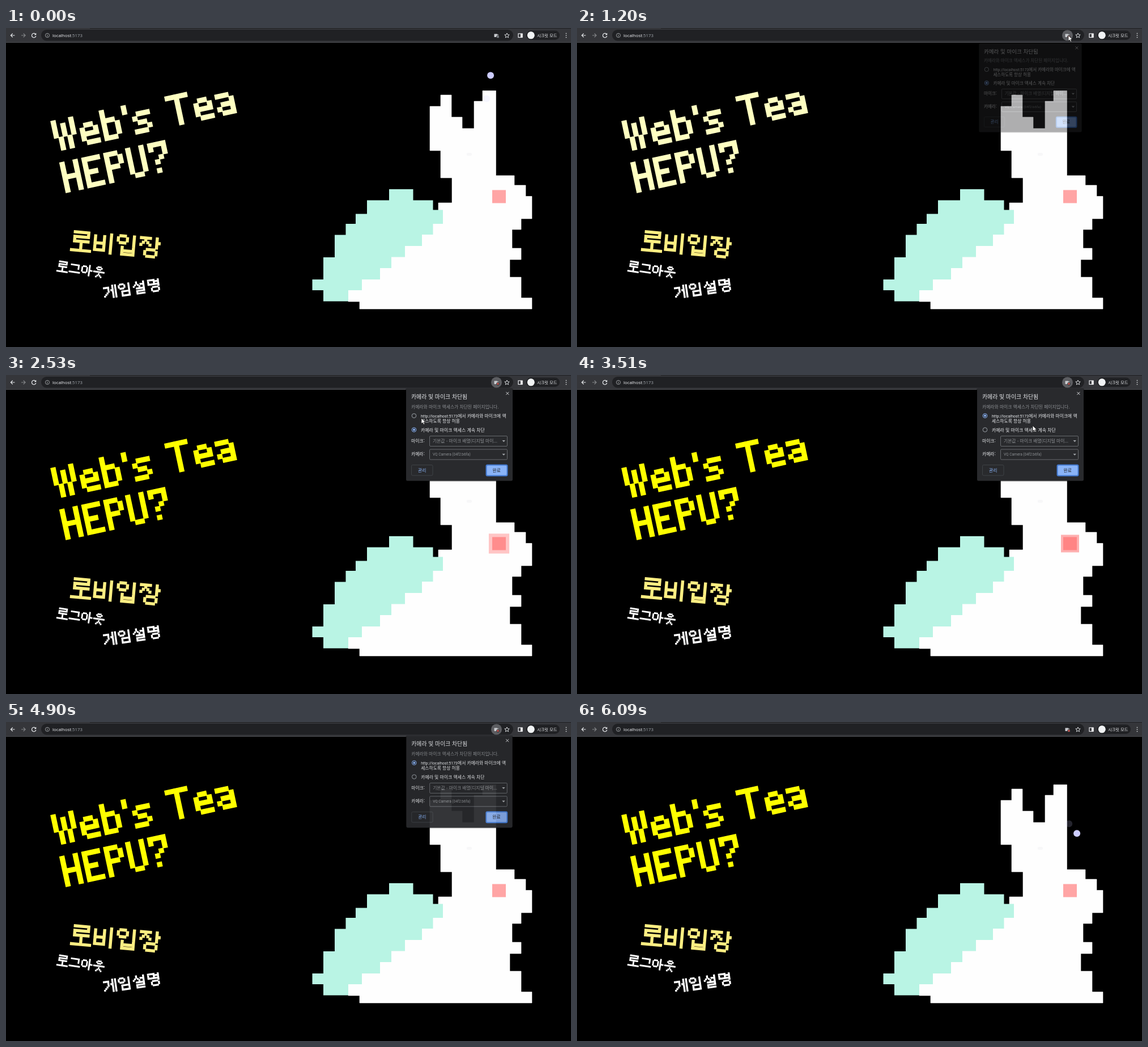
An HTML page for the animation above (6160 ms loop, 997 by 562 pixels).

```html
<!DOCTYPE html>
<html lang="ko">
<head>
<meta charset="utf-8">
<title>localhost:5173</title>
<style>
  html, body { margin: 0; width: 100%; height: 100%; overflow: hidden; background: #000; }
  svg { display: block; width: 100vw; height: 100vh; }
  text { font-family: "Noto Sans CJK KR", "Noto Sans CJK", sans-serif; font-size: 7.8px; fill: #e8eaed; white-space: pre; }
  .latin { font-family: Roboto, sans-serif; }
  .dim { fill: #8b8e92; }
  .pixel path { fill: none; stroke-linecap: square; }
  #title path { stroke-width: 1.18; }
  #menu path { stroke-width: 1.35; }
  .line { fill: none; stroke: #e8eaed; stroke-width: 1.2; }
</style>
</head>
<body>
<svg viewBox="0 0 997 562" xmlns="http://www.w3.org/2000/svg">
  <rect width="997" height="562" fill="#000"/>

  <g id="title" class="pixel" role="img" aria-label="Web's Tea HEPU?"></g>
  <g id="menu" class="pixel"></g>

  <g id="rabbit">
    <path fill="#fefefe" stroke="#fefefe" stroke-width=".6" d="M767 118H786V157H805V177H826V129H841V110.500H864.500V260H897V277H917V296.500H928V336H909V355H893V388H909V408H889V439H909V475.500H928V495H624V482H604V455L760 325H763V308H787V264H767V216H748V138H767Z"/>
    <path fill="#b9f4e4" d="M676 284H718.500V303.500H753.500V320.500H771V345H753.500V364H734V384H704V403.500H680V423H660V443H628V462H604V481.500H560V462H540.500V443H560V404H580V364.500H599.500V345H617V327.500H637V303.500H676Z"/>
    <rect x="813" y="220" width="9" height="5" rx="2" fill="#f7f7f8"/>
    <rect x="858" y="285.500" width="24" height="23" fill="#ffa5a5"/>
    <rect id="pulse" fill="#ff6464"/>
  </g>

  <circle id="trail" r="6" fill="#ccccff" opacity=".18"/>
  <circle id="dot" r="6" fill="#ccccff"/>

  <g id="toolbar">
    <rect width="997" height="26" fill="#35363a"/>
    <rect x="148" width="849" height="1" fill="#202124"/>
    <rect y="25" width="997" height="1" fill="#4a4b4f"/>
    <rect x="62" y="3" width="833" height="19.500" rx="9.750" fill="#202124"/>
    <path class="line" d="M15.500 13H8.500M11.800 9.600L8.400 13L11.800 16.400"/>
    <path class="line" style="stroke:#85878a" d="M27 13H34M30.700 9.600L34.100 13L30.700 16.400"/>
    <path class="line" d="M52 10.700A3.700 3.700 0 1 0 52.800 14"/>
    <path fill="#e8eaed" d="M53.300 8.800V12.300H49.800Z"/>
    <circle class="line" cx="73" cy="13" r="3.600" style="stroke:#b4b7ba;stroke-width:.8"/>
    <path class="line" d="M73 12.500V15M73 10.700V11.500" style="stroke:#b4b7ba;stroke-width:.9"/>
    <text x="82" y="15.800" style="font-family:'Noto Sans',sans-serif">localhost<tspan fill="#9aa0a6">:5173</tspan></text>
    <circle id="hover" cx="865.500" cy="13" r="9.500" fill="#5c5d61"/>
    <path fill="#c9ccd0" d="M861.500 10.500H867.200V12.300L869 11.300V16H861.500Z"/>
    <circle cx="868" cy="15.500" r="2.700" fill="#303134"/>
    <path id="cross" d="M866.600 14.100L869.400 16.900M869.400 14.100L866.600 16.900" stroke-width="1.200"/>
    <path class="line" style="stroke-width:.9" d="M884 9L885.200 11.800L888.200 12L885.900 14L886.600 17L884 15.400L881.400 17L882.100 14L879.800 12L882.800 11.800Z"/>
    <rect class="line" x="904" y="10" width="7" height="6.500"/>
    <rect x="908" y="10" width="3.500" height="6.500" fill="#fff"/>
    <rect x="918" y="4.500" width="59" height="16.500" rx="8.250" fill="#202124"/>
    <circle cx="926.300" cy="12.800" r="6.500" fill="#f1f3f4"/>
    <text x="937" y="15.500" style="font-size:7.250px">시크릿 모드</text>
    <path d="M988.500 9.500v0M988.500 13v0M988.500 16.500v0" stroke="#e8eaed" stroke-width="1.700" stroke-linecap="round"/>
  </g>

  <g id="dialog">
    <rect x="705" y="23.500" width="190" height="164" rx="3" fill="#000" opacity=".35"/>
    <rect x="706" y="24" width="188" height="162.500" rx="2.500" fill="#292a2d"/>
    <path class="line" style="stroke-width:.9" d="M882.400 29.900L887.400 34.900M887.400 29.900L882.400 34.900"/>
    <text x="715" y="42.300" style="font-size:9.900px">카메라 및 마이크 차단됨</text>
    <text x="715" y="58.700" class="dim">카메라와 마이크 액세스가 차단된 페이지입니다.</text>
    <circle class="radio" cx="720" cy="71.800" r="3.800" fill="none"/>
    <circle class="radio" cx="720" cy="96.500" r="3.800" fill="none"/>
    <circle id="pick" cx="720" r="2" fill="#8ab4f8"/>
    <text x="732" y="75"><tspan class="latin" style="font-size:7px">http://localhost:5173</tspan>에서 카메라와 마이크에 액</text>
    <text x="732" y="84.300">세스하도록 항상 허용</text>
    <text x="732" y="99.500" style="font-size:7.900px">카메라 및 마이크 액세스 계속 차단</text>
    <text x="715" y="118.700">마이크:</text>
    <text x="715" y="142.300">카메라:</text>
    <g fill="none" stroke="#66696d" stroke-width="1">
      <rect x="747.500" y="107.500" width="137" height="18" rx="1.500"/>
      <rect x="747.500" y="131" width="137" height="18" rx="1.500"/>
      <rect x="715.500" y="158.500" width="37.500" height="18.500" rx="2" stroke="#3f4246"/>
    </g>
    <text x="753" y="118.700" class="dim">기본값 - 마이크 배열(디지털 마이...</text>
    <text x="753" y="142.300" class="dim latin" style="font-size:6.500px">VQ Camera (04f2:b6fa)</text>
    <path fill="#a5a8ac" d="M875.500 115H881L878.250 118ZM875.500 138.700H881L878.250 141.700Z"/>
    <text x="727" y="170.700" style="fill:#8ab4f8">관리</text>
    <rect x="846.500" y="157.500" width="39" height="21" rx="3" fill="#4279d0"/>
    <rect id="ok" x="848.500" y="159.500" width="35" height="17" rx="1.500"/>
    <text x="858.500" y="170.700" style="fill:#202124">완료</text>
  </g>

  <path id="arrow" fill="#fff" stroke="#111" stroke-width=".7" d="M0 0V9.800L2.300 7.800L3.900 11.300L5.700 10.500L4.100 7.100H7.100Z"/>
</svg>
<script>
const LOOP = 6160, BEAT = 1053;
const $ = id => document.getElementById(id);
const set = (el, attrs) => { for (const k in attrs) el.setAttribute(k, attrs[k]); };
const clamp = v => Math.max(0, Math.min(1, v));
const show = (el, on) => set(el, { visibility: on ? 'visible' : 'hidden' });

// Pixel letters as strokes on a unit grid: [width, path]
const LATIN = {
  W: [5, 'M0 0V3M4 0V3M2 1V3M1 4V6M3 4V6'],
  e: [4, 'M1 2H2M0 3V5M3 3V4H1M1 6H3'],
  b: [4, 'M0 0V6H2M1 2H2M3 3V5'],
  "'": [1, 'M0 0V1'],
  s: [4, 'M1 2H3M0 3h0M1 4H2M3 5h0M0 6H2'],
  T: [5, 'M0 0H4M2 0V6'],
  a: [4, 'M0 2H2M3 3V6H1M1 4H2M0 5h0'],
  H: [4, 'M0 0V6M3 0V6M0 3H3'],
  E: [4, 'M3 0H0V6H3M0 3H2'],
  P: [4, 'M0 6V0H2M3 1V2M2 3H0'],
  U: [4, 'M0 0V5M3 0V5M1 6H2'],
  '?': [4, 'M0 1h0M0 0H3V2M2 3h0M1 4h0M1 6h0'],
  ' ': [2, '']
};
const RING = 'M1 0H3M0 1V2M4 1V2M1 3H3', LOW_RING = 'M3 5H6M2 6V7M7 6V7M3 8H6';
const HANGUL = {
  로: 'M1 0H7V2H1V4H7M4 5V8M0 8H8',
  비: 'M0 1V7H4V1M0 4H4M7 0V8',
  입: RING + 'M7 0V4M2 5V8H7V5M2 6.500H7',
  장: 'M0 0H4M2 1h0M1 2h0M3 2h0M0 3h0M4 3h0M7 0V4M7 2H8' + LOW_RING,
  그: 'M1 1H7V4M0 7H8',
  아: 'M1 1H3M0 2V5M4 2V5M1 6H3M6 0V8M7 4H8',
  웃: 'M3 0H5M2 1h0M6 1h0M3 2H5M0 4H8M4 4V6M3 7h0M5 7h0M2 8h0M6 8h0',
  게: 'M0 1H3V4M2 5h0M1 6h0M0 7h0M5 3H6M6 0V8M8 0V8',
  임: RING + 'M7 0V4M2 5H7V8H2V5',
  설: 'M2 0V1M1 2h0M3 2h0M0 3h0M4 3h0M5 1.500H7M7 0V3M2 4.400H7V6.200H2V8H7',
  명: 'M0 0H4V3H0V0M5 1H7M5 3H7M7 0V4' + LOW_RING
};

function addGlyph(parent, d, x, y) {
  const p = document.createElementNS('http://www.w3.org/2000/svg', 'path');
  set(p, { d, transform: `translate(${x + .5} ${y + .5})` });
  parent.appendChild(p);
}
function addTitle() {
  const g = $('title');
  set(g, { transform: 'translate(79 164.500) rotate(-12.100) scale(7.900 7.700)' });
  ["Web's Tea", 'HEPU?'].forEach((line, row) => {
    let x = 0;
    for (const c of line) {
      const [w, d] = LATIN[c];
      if (d) addGlyph(g, d, x, row * 9.7);
      x += w + 1;
    }
  });
}
function addLabel(word, x, y, angle, cell, pitch, color) {
  const g = document.createElementNS('http://www.w3.org/2000/svg', 'g');
  set(g, { transform: `translate(${x} ${y}) rotate(${angle}) scale(${cell})`, stroke: color, role: 'img', 'aria-label': word });
  [...word].forEach((c, i) => addGlyph(g, HANGUL[c], i * pitch, 0));
  $('menu').appendChild(g);
}
addTitle();
addLabel('로비입장', 116.5, 356.5, 5, 4, 10.1, '#fdee82');
addLabel('로그아웃', 92, 409.5, 8.5, 2.15, 10, '#fff');
addLabel('게임설명', 171, 455, -8, 2.5, 10.5, '#fff');

// Pointer path: [time, x, y]
const PATH = [
  [-70, 848, 125], [0, 855, 84], [70, 860, 50], [140, 864, 24], [280, 866, 14], [780, 867, 13],
  [1330, 867, 13], [1690, 862, 44], [2320, 745, 70], [2530, 733, 76], [2800, 722, 72], [3050, 722, 72],
  [3510, 804, 89], [3620, 814, 106], [4200, 858, 171], [5950, 859, 171], [6020, 868, 179],
  [6090, 882, 196], [6160, 889, 206]
];
function pointer(t) {
  let i = 1;
  while (i < PATH.length - 1 && PATH[i][0] < t) i++;
  const [t0, x0, y0] = PATH[i - 1], [t1, x1, y1] = PATH[i];
  const k = clamp((t - t0) / (t1 - t0));
  return [x0 + (x1 - x0) * k, y0 + (y1 - y0) * k];
}

function draw(t) {
  const phase = t % BEAT;
  set($('title'), { stroke: phase > 344 && phase < 870 ? '#ffff00' : '#ffffc1' });

  const age = (phase - 211) / 425, grow = 12 * age;
  show($('pulse'), age > 0 && age < 1);
  if (age > 0 && age < 1) {
    set($('pulse'), { x: 858 - grow, y: 285.5 - grow, width: 24 + 2 * grow, height: 23 + 2 * grow, opacity: .75 * (1 - age) });
  }

  const [x, y] = pointer(t), [px, py] = pointer(t - 70);
  const late = t >= 5950;
  set($('dot'), { cx: x, cy: y });
  set($('trail'), { cx: px, cy: py });
  show($('dot'), t < 120 || late);
  show($('trail'), t < 190 || t >= 6020);
  set($('arrow'), { transform: `translate(${x} ${y})` });
  show($('arrow'), t >= 120 && t < 4900);

  set($('hover'), { opacity: Math.min(clamp((t - 890) / 200), clamp((5800 - t) / 200)) });
  set($('cross'), { stroke: t >= 920 ? '#f0625a' : '#9aa0a6' });

  const a = Math.min(clamp((t - 1125) / 203), clamp((5128 - t) / 240));
  const s = .943 + .057 * a;
  set($('dialog'), { opacity: a, transform: `translate(800 105) scale(${s}) translate(-800 -105)` });
  show($('dialog'), a > 0);

  const allow = t >= 2950;
  document.querySelectorAll('.radio').forEach((r, i) =>
    set(r, { stroke: (i === 0) === allow ? '#8ab4f8' : '#9aa0a6' }));
  set($('pick'), { cy: allow ? 71.8 : 96.5 });
  set($('ok'), { fill: t > 4100 ? '#82a7e5' : '#8ab4f8' });
}

const start = performance.now();
function tick() {
  draw((performance.now() - start) % LOOP);
  requestAnimationFrame(tick);
}
tick();
</script>
</body>
</html>
```
